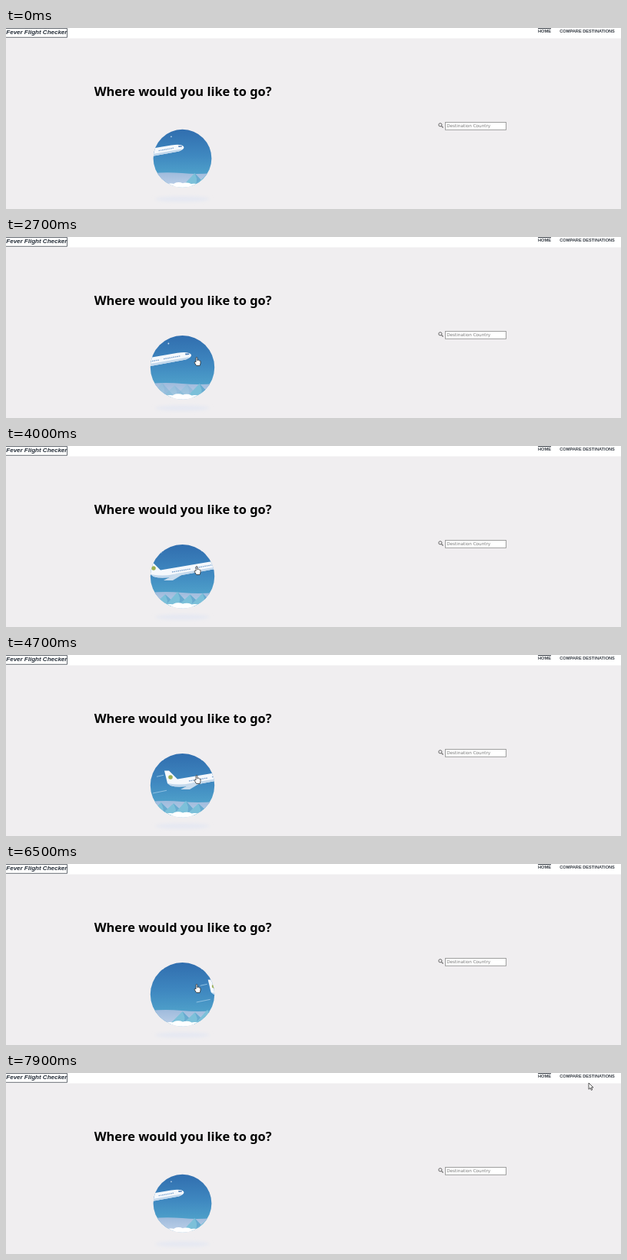
Write an HTML page that moves like this. It is 800x237 px and loops after 8 s.

```html
<!DOCTYPE html>
<html lang="en">
<head>
<meta charset="utf-8">
<title>Where would you like to go?</title>
<style>
  html, body { margin: 0; width: 100%; height: 100%; overflow: hidden; background: #f0eef0; }
  svg { display: block; width: 800px; height: 237px; }
  .nav { font: bold 5.65px "Liberation Sans", Arial, sans-serif; fill: #343a42; }
  .brand { font: italic bold 8px "Liberation Sans", Arial, sans-serif; fill: #222b36; }
  .title { font: bold 16.43px "Noto Sans", "Open Sans", sans-serif; }
  .hint { font: 5.7px "DejaVu Sans", sans-serif; fill: #7b7b7b; }
</style>
</head>
<body>
<svg viewBox="0 0 800 237">
  <defs>
    <linearGradient id="sky" x1="0" y1="0" x2="0" y2="1">
      <stop offset="0" stop-color="#306dae"/>
      <stop offset=".45" stop-color="#3f88c0"/>
      <stop offset=".8" stop-color="#50a3cb"/>
    </linearGradient>
    <linearGradient id="haze" x1="0" y1="0" x2="0" y2="1">
      <stop offset="0" stop-color="#9fbbdc"/>
      <stop offset="1" stop-color="#c0d2ea"/>
    </linearGradient>
    <clipPath id="disc"><circle cx="229.5" cy="170.7" r="41.7"/></clipPath>
    <filter id="blur" x="-30%" y="-100%" width="160%" height="300%"><feGaussianBlur stdDeviation="2.2"/></filter>
  </defs>

  <rect width="800" height="237" fill="#f0eef0"/>
  <rect width="800" height="13.5" fill="#fff"/>
  <path d="M0 .5H79.5V12.3H0" fill="none" stroke="#555b62" stroke-width=".9"/>
  <text class="brand" x=".3" y="8.3">Fever Flight Checker</text>
  <path d="M692 .5H709" stroke="#343a42"/>
  <text class="nav" x="692" y="6.4">HOME</text>
  <text class="nav" x="720.3" y="6.4">COMPARE DESTINATIONS</text>

  <text class="title" x="114.7" y="88.7">Where would you like to go?</text>

  <g fill="none" stroke="#666">
    <circle cx="564.9" cy="126.8" r="2.1"/>
    <path d="M566.5 128.4L568.6 130.5" stroke-width="1.2"/>
  </g>
  <rect x="571.5" y="123.5" width="79" height="9.8" fill="#fff" stroke="#959595" stroke-width=".9"/>
  <text class="hint" x="573.2" y="130.3">Destination Country</text>

  <ellipse cx="229.5" cy="224" rx="36" ry="3.5" fill="#e5e8f2" filter="url(#blur)"/>

  <g id="badge">
    <g clip-path="url(#disc)">
      <rect x="187" y="128" width="85" height="86" fill="url(#sky)"/>
      <circle id="star" cy="139.5" r=".9" fill="#d5e6f5"/>
      <path d="M187 192Q208 190 229 192T272 192V214H187Z" fill="url(#haze)"/>
      <g id="range"></g>
      <g id="mist" fill="#fff"><path d="M187 210.5H272V214H187Z"/></g>
      <g id="plane">
        <path d="M191 181L209 177.300M196 159.300L205 157.300" stroke="#8fc0e2"/>
        <path d="M206 151.500H212L223 162.500L286 151.800Q300 149.500 303.500 153.500Q306 157 297 160.500L240 171Q224 174 214 171L210 168Z" fill="#f5f8fc"/>
        <path d="M210 168Q226 171 240 168L302 157L297 160.500L240 171Q224 174 214 171Z" fill="#c3d8ec"/>
        <path d="M257 165L239 176H227L244 167Z" fill="#c9dced"/>
        <path d="M238 165L262 161M268 159.700L290 155.700" stroke="#7ba3cf" stroke-width="1.300" stroke-dasharray="1.700 .8"/>
        <path d="M296 152.600H301L301.500 154L296.500 154.600Z" fill="#4a7db8"/>
        <circle cx="214" cy="160" r="2.800" fill="#9db052"/>
      </g>
    </g>
  </g>

  <path id="arrow" d="M0 0V8.300L2 6.500L3.400 9.500L4.700 8.900L3.300 6H6Z" fill="#fff" stroke="#222" stroke-width=".75"/>
  <path id="hand" d="M-.9 6V.9Q-.9 0 0 0T.9 .9V4Q3 3 3.700 4.600Q5 4.300 5 5.600V7.800L4.200 11H-.3L-2.700 7.200Q-3.100 5.800-1.900 5.900Z" fill="#fff" stroke="#222" stroke-width=".75"/>
</svg>
<script>
const LOOP = 8000, STEP = 100;
const ENTER = 1000, APPROACH = 2100, HOVER_IN = 2300, TAKEOFF = 2400, LEAVE = 6600, HOVER_OUT = 6700;
const PLANE_SPEED = 31.5, RANGE_SPEED = 15.5, STAR_SPEED = 7; // px per second
const TAIL_TIME = 4700; // when the plane sits at its drawn place

const el = id => document.getElementById(id);
const clamp = v => Math.max(0, Math.min(1, v));
const phase = (t, from, length) => clamp((t - from) / length);
const easeOut = (f, power) => 1 - (1 - f) ** power;
const move = (id, x, y) => el(id).setAttribute("transform", `translate(${x} ${y})`);

// Evenly spaced peaks; all but the right ones start hidden in the haze.
function peak(i) {
  const x = 164 + 16.2 * i, y = 193 + 2 * Math.sin(i * 2.4), w = 17;
  return `<g class="${i < 5 ? "soft" : ""}">
    <path d="M${x - w} 210L${x} ${y}L${x + w} 210Z" fill="#7cc0d9"/>
    <path d="M${x} ${y}L${x + w} 210H${x + 2}L${x + 3} ${y + 8}Z" fill="#68abd0"/></g>`;
}
function puff(i) {
  return `<ellipse cx="${202 + 11 * i}" cy="${210 + Math.sin(i * 2)}" rx="8" ry="4"/>`;
}
const repeat = (n, part) => Array.from({ length: n }, (_, i) => part(i)).join("");
el("range").innerHTML = repeat(7, peak);
el("mist").innerHTML += repeat(6, puff);
const soft = document.querySelectorAll(".soft");

// The pointer glides in, steps onto the badge, then leaves for the menu.
function pointer(t) {
  const enter = easeOut(phase(t, ENTER, 800), 2);
  const approach = phase(t, APPROACH, 300);
  const leave = phase(t, LEAVE, 1300);
  return [
    383 - 104 * enter - 31 * approach + 510 * leave,
    192 - 44 * enter + 9.5 * approach - 144.5 * easeOut(leave, 1.6)
  ];
}

function draw(t) {
  const hover = t >= HOVER_IN && t < HOVER_OUT;
  const clip = hover ? Math.max(t, TAKEOFF) : TAKEOFF;
  const drift = (clip - TAKEOFF) / 1000;

  const grow = phase(t, HOVER_IN - STEP, 200) - phase(t, HOVER_OUT - STEP, 200);
  const size = (1 + .1 * grow) / 1.1;
  el("badge").setAttribute("transform", `translate(229.5 170.7) scale(${size}) translate(-229.5 -170.7)`);

  move("plane", (clip - TAIL_TIME) / 1000 * PLANE_SPEED, 0);
  move("range", 2 + drift * RANGE_SPEED, 0);
  soft.forEach(p => p.setAttribute("opacity", clamp(drift / .9)));
  el("star").setAttribute("cx", 213.5 - drift * STAR_SPEED);
  el("star").setAttribute("opacity", clamp(2 - drift));

  const [x, y] = pointer(t);
  el("arrow").setAttribute("visibility", t >= ENTER && !hover ? "visible" : "hidden");
  el("hand").setAttribute("visibility", hover ? "visible" : "hidden");
  move("arrow", x, y);
  move("hand", x, y);
}

const start = performance.now();
function tick() {
  const t = (performance.now() - start) % LOOP;
  draw(Math.floor(t / STEP) * STEP);
  requestAnimationFrame(tick);
}
tick();
</script>
</body>
</html>
```
